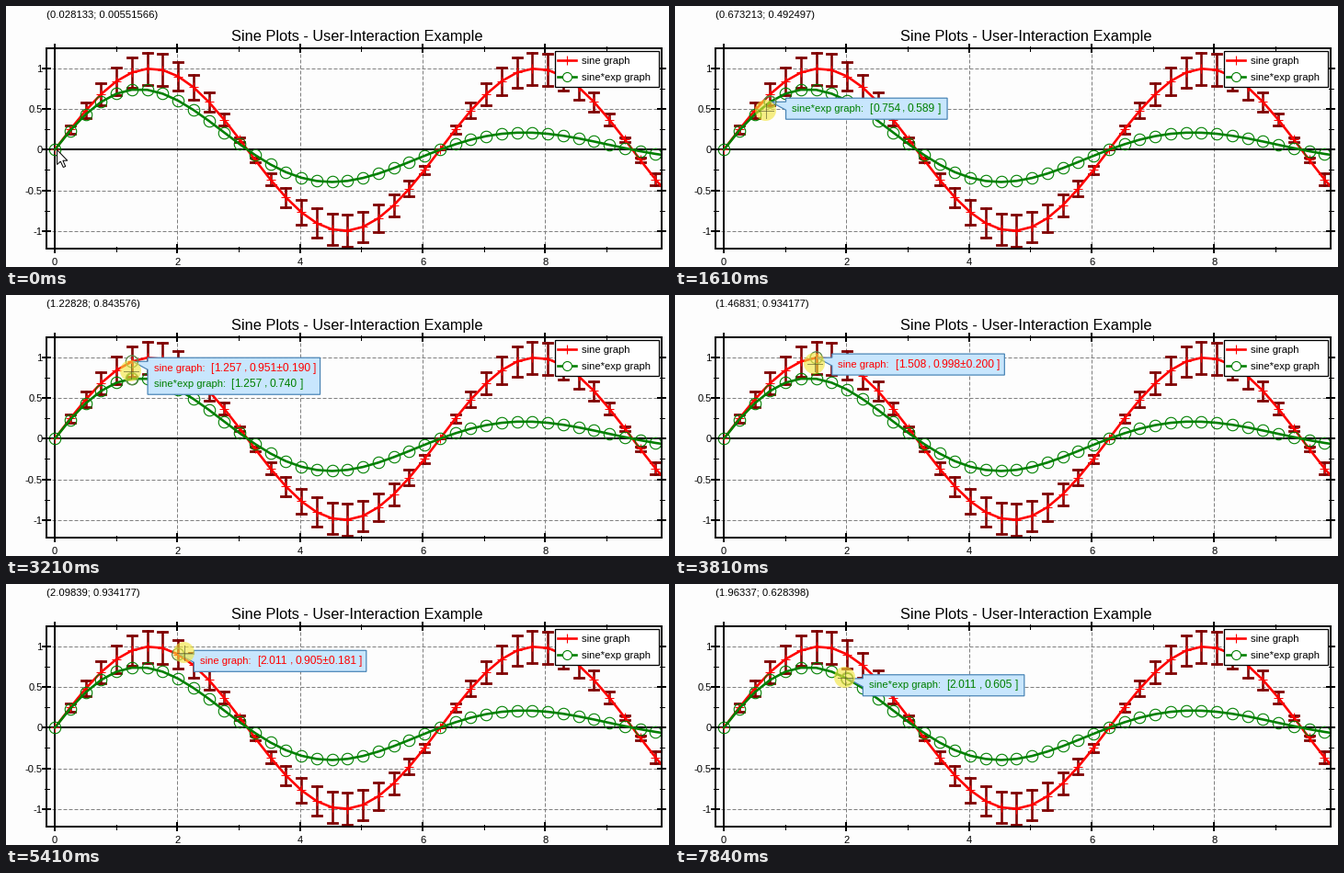
Recreate the animation shown at these times as a matplotlib script. Size 721 by 284 pixels, loop 8000 ms.

```python
import numpy as np
import matplotlib.pyplot as plt
from matplotlib.animation import FuncAnimation
from matplotlib.patches import Circle, Polygon, Rectangle

W, H, DPI = 721, 284, 64
PT = 72 / DPI                      # points per pixel
X0, Y0 = 53.1, 156.4               # stage position of the data origin
SX, SY = 66.66, 88.3               # pixels per data unit
LEFT, TOP, RIGHT, BOTTOM = 44, 46, 713, 264
RED, GREEN, DARK_RED = "#ff0000", "#008000", "#800000"
BACK = "#fdfdfd"

plt.rcParams["font.family"] = "Liberation Sans"
fig = plt.figure(figsize=(W / DPI, H / DPI), dpi=DPI, facecolor=BACK)
ax = fig.add_axes([0, 0, 1, 1])
ax.set_xlim(0, W)
ax.set_ylim(H, 0)
ax.axis("off")


def px(x):
    return X0 + SX * x


def py(y):
    return Y0 - SY * y


def line(xs, ys, color="black", width=1, z=2, **kw):
    return ax.plot(xs, ys, color=color, lw=width * PT, zorder=z, **kw)[0]


def label(x, y, s, size=11.1, color="black", ha="left", z=8):
    return ax.text(x, y, s, size=size * PT, color=color, ha=ha, va="baseline", zorder=z)


def shape(patch):
    ax.add_patch(patch)
    return patch


step = 2 * np.pi / 25
xs = step * np.arange(41)
sine = np.sin(xs)
damped = sine * np.exp(-0.2 * xs)
error = 0.2 * np.abs(sine)


def draw_axes():
    dash = dict(color="#808080", z=1, linestyle=(0, (4, 2)))
    for v in (-1, -0.5, 0.5, 1):
        line([LEFT, RIGHT], [py(v)] * 2, **dash)
    for v in (2, 4, 6, 8):
        line([px(v)] * 2, [TOP, BOTTOM], **dash)
    line([LEFT, RIGHT], [Y0, Y0], width=2)
    line([px(0)] * 2, [TOP, BOTTOM], width=2)
    shape(Rectangle((LEFT, TOP), RIGHT - LEFT, BOTTOM - TOP, fill=False,
                    lw=2 * PT, zorder=6))
    for v in range(10):
        size, width = (4, 2) if v % 2 == 0 else (2.5, 1)
        for edge in (TOP, BOTTOM):
            line([px(v)] * 2, [edge - size, edge + size], width=width, z=6)
        if v % 2 == 0:
            label(px(v), 281.5, str(v), ha="center")
    for v in np.arange(-4, 5) / 4:
        major = v % 0.5 == 0
        size, width = (4, 2) if major else (2.5, 1)
        for edge in (LEFT, RIGHT):
            line([edge - size, edge + size], [py(v)] * 2, width=width, z=6)
        if major:
            label(39.5, py(v) + 4, f"{v:g}", ha="right")
    label(381.5, 38, "Sine Plots - User-Interaction Example", 16.35, ha="center")


def draw_graphs():
    clip = Rectangle((LEFT, TOP), RIGHT - LEFT, BOTTOM - TOP, transform=ax.transData)
    parts = []
    for x, y, e in zip(px(xs[1:]), py(sine[1:]), SY * error[1:]):
        parts.append(line([x, x], [y - e, y + e], DARK_RED, 2.6, 3))
        for end in (y - e, y + e):
            parts.append(line([x - 5, x + 5], [end, end], DARK_RED, 2.8, 3))
    parts.append(line(px(xs), py(sine), RED, 2.6, 3.5))
    parts.append(line(px(xs), py(sine), RED, 0, 3.5, marker="+", ms=10 * PT, mew=PT))
    parts.append(line(px(xs), py(damped), GREEN, 2.6, 4))
    parts.append(line(px(xs), py(damped), GREEN, 0, 4, marker="o", ms=12.5 * PT,
                      mew=1.1 * PT, mfc="none"))
    for part in parts:
        part.set_clip_path(clip)


def draw_legend():
    shape(Rectangle((596.5, 48.5), 113, 39.5, fc="white", ec="black", lw=1.3 * PT, zorder=7))
    rows = ((59.3, RED, "+", "sine graph"), (77.3, GREEN, "o", "sine*exp graph"))
    for y, color, mark, name in rows:
        line([600, 620], [y, y], color, 2.6, 7.5)
        line([609.5], [y], color, 0, 7.5, marker=mark, ms=10 * PT, mew=1.1 * PT,
             mfc="white" if mark == "o" else "none")
        label(625.5, y + 3.7, name, 11.3)


# Mouse path: step number, x, y in whole pixels
PATH = np.array([
    (0, 55, 156), (6, 82, 126), (7, 88, 119), (8, 98, 113), (12, 115, 98),
    (13, 119, 89), (19, 151, 74), (24, 184, 74), (27, 193, 74), (30, 160, 93),
    (31, 154, 95), (32, 154, 95), (33, 151, 88), (38, 181, 98), (39, 184, 101)])
ARROW = np.array([(0, 0), (0, 16), (3.8, 12.6), (6.8, 19), (9.2, 18),
                  (6.4, 11.7), (11.3, 11.7)])
live = []


def mouse_at(i):
    return [int(round(np.interp(i, PATH[:, 0], PATH[:, n]))) for n in (1, 2)]


def tooltip(k, rows):
    x, y = px(xs[k]), py(rows[0][1])
    left, top = x + 17.2, y - 4.2
    right = left + (187.5 if rows[0][3] else 175.5)
    bottom = top + 6 + 17 * len(rows)
    live.append(shape(Polygon(
        [(x + 1, y), (left, top + 4), (left, top), (right, top), (right, bottom),
         (left, bottom), (left, top + 13)],
        fc="#c8e6fd", ec="#4682b4", lw=1.2 * PT, zorder=9)))
    for n, (name, value, color, err) in enumerate(rows):
        base = top + 14.5 + 17 * n
        bracket = left + 6.5 + (62 if err else 84)
        number = f"{value:.3f}" + (f"±{err:.3f}" if err else "")
        pieces = ((bracket, "["), (bracket + 4, f"{xs[k]:.3f}"), (bracket + 36, ","),
                  (bracket + 41.5, number), (bracket + (111 if err else 75), "]"))
        live.append(label(left + 6.5, base, name + ":", 11.3, color, z=10))
        for at, s in pieces:
            live.append(label(at, base, s, 12, color, z=10))
        live.append(shape(Circle((x, py(value)), 6.5, fill=False, ec="#5f8a4a",
                                 lw=1.3 * PT, zorder=10)))


def hover(mx, my):
    k = int(round((mx - X0) / SX / step))
    rows = []
    for name, value, color, err in (("sine graph", sine[k], RED, error[k] + 1e-9),
                                    ("sine*exp graph", damped[k], GREEN, 0)):
        if np.hypot(mx - px(xs[k]), my - py(value)) < 11:
            rows.append((name, value, color, err))
    if rows:
        tooltip(k, rows)


def draw(i):
    while live:
        live.pop().remove()
    mx, my = mouse_at(i)
    vx = 0.028133 + (mx - 55) * 0.01500186
    vy = 0.00551566 + (156 - my) * 0.01132514
    live.append(label(43.5, 13, f"({vx:.6g}; {vy:.6g})", 11.25))
    if i == 0:
        live.append(shape(Polygon(ARROW + (mx + 0.5, my + 0.5), fc="white", ec="black",
                                  lw=PT, zorder=12)))
        return live
    if not 29 <= i <= 33:
        hover(mx, my)
    cx, cy = mx + 0.5, my + 0.5
    live.append(shape(Circle((cx, cy), 11.5, fc="#f2e63c", ec="none", alpha=0.62, zorder=11)))
    live.append(line([cx - 8, cx + 8], [cy, cy], "#55552a", 1, 12, alpha=0.6))
    live.append(line([cx, cx], [cy - 8, cy + 8], "#55552a", 1, 12, alpha=0.6))
    return live


draw_axes()
draw_graphs()
draw_legend()
anim = FuncAnimation(fig, draw, frames=40, interval=200, repeat=True, repeat_delay=0)
plt.show()
```
